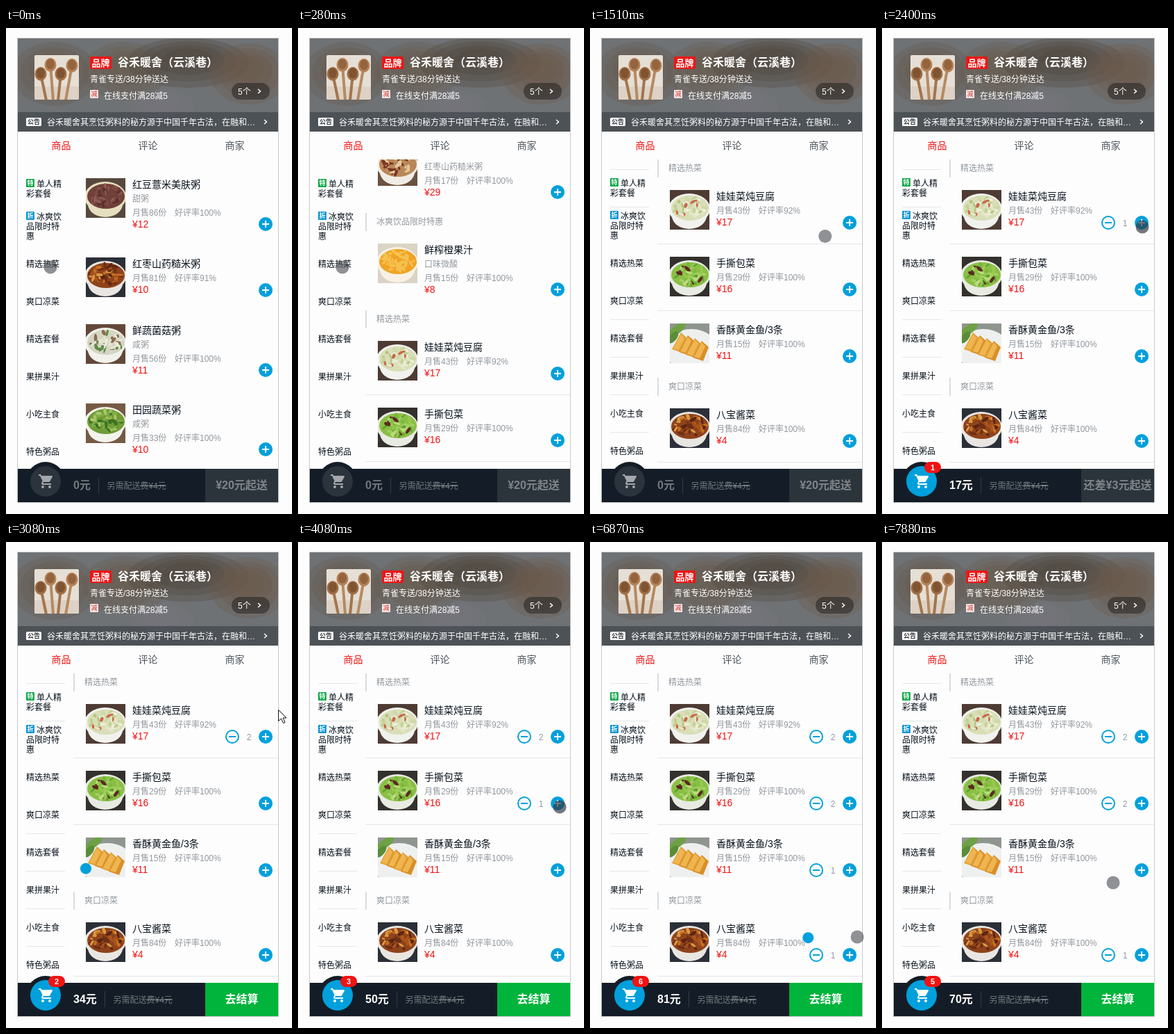
These frames come from a looping animation (412 by 699 pixels, 8000 ms). An HTML page with a canvas:

```html
<!DOCTYPE html>
<html lang="zh-CN">
<head>
<meta charset="utf-8">
<title>点餐</title>
<style>
html, body { margin: 0; width: 100%; height: 100%; overflow: hidden; background: #fdfdfd; }
canvas { display: block; width: 412px; height: 699px; }
</style>
</head>
<body>
<canvas id="stage"></canvas>
<script>
const W = 412, H = 699, LOOP = 8000;
const canvas = document.getElementById('stage');
const g = canvas.getContext('2d');
const dpr = window.devicePixelRatio || 1;
canvas.width = W * dpr;
canvas.height = H * dpr;

const FONT = '"Liberation Sans", "Noto Sans CJK SC", "Noto Sans CJK", sans-serif';
const RED = '#f01414', BLUE = '#00a0dc', DARK = '#141d27', GREY = '#93999f', INK = '#07111b';

const CART = new Path2D('M7 18a2 2 0 1 0 0 4a2 2 0 0 0 0-4zM1 2v2h2l3.6 7.6-1.35 2.4c-.7 1.3.25 3 1.75 3h12v-2H7.4c-.2 0-.3-.2-.2-.4l.9-1.6h7.45c.75 0 1.4-.4 1.75-1l3.6-6.5c.35-.7-.1-1.5-.9-1.5H5.2l-.9-2zM17 18a2 2 0 1 0 0 4a2 2 0 0 0 0-4z');

// The screen refreshes in bursts: [first, last, count]
const BURSTS = [
  [130, 580, 5], [700, 1120, 3], [1240, 1640, 4], [1950, 2400, 4], [2800, 3350, 5],
  [3780, 4080, 3], [4540, 5140, 5], [5410, 5690, 3], [5820, 6320, 5], [6470, 6590, 2],
  [6870, 7420, 5], [7880, 7880, 1]
];

// Cart clicks: [time, product key, change]
const CLICKS = [
  [1890, 'tofu', 1], [2750, 'tofu', 1], [3680, 'cabbage', 1], [4490, 'cabbage', 1],
  [5357, 'fish', 1], [6803, 'pickle', 1], [7870, 'fish', -1]
];

// Pointer path: [time, x, y]
const PATH = [
  [0, 64, 344], [360, 64, 344], [580, 62, 377], [820, 110, 385], [1120, 245, 353],
  [1640, 371, 281], [1950, 371, 281], [2400, 375, 286], [2937, 376, 280], [3075, 392, 241],
  [3212, 392, 272], [3350, 377, 381], [4840, 377, 381], [5140, 377, 475], [5410, 377, 475],
  [5690, 397, 530], [5945, 397, 545], [6320, 384, 587], [6590, 381, 590], [6870, 385, 568],
  [7280, 332, 471], [7420, 333, 490], [8000, 333, 490]
];

// Dish colours: table, bowl, food, then the pieces
const STEW = ['#2b2f38', '#e9e6e2', '#8f431b', '#c8701f', '#5c2413', '#a8531c', '#d99a45', '#6e2f16'];

// Strings are section headings
const GOODS = [
  { name: '红豆薏米美肤粥', desc: '甜粥', sold: 86, rate: 100, price: 12, look: ['#57483f', '#e6dfbf', '#70403a', '#5a302c', '#7d4a43', '#8d5b52'] },
  { name: '红枣山药糙米粥', sold: 81, rate: 91, price: 10, look: STEW },
  { name: '鲜蔬菌菇粥', desc: '咸粥', sold: 56, rate: 100, price: 11, look: ['#63483a', '#f2f1ec', '#d3d6c2', '#5f8a4a', '#eeeadb', '#e3e2d0', '#8b6b52'] },
  { name: '田园蔬菜粥', desc: '咸粥', sold: 33, rate: 100, price: 10, look: ['#755a45', '#f3f3ee', '#6f9c36', '#3d7423', '#a9c668', '#82ad45'] },
  '单人精彩套餐',
  { name: '红枣山药粥套餐', desc: '红枣山药糙米粥', sold: 17, rate: 100, price: 29, look: ['#6b5140', '#efece5', '#b98858', '#7c3522', '#e2c9a0'] },
  '冰爽饮品限时特惠',
  { name: '鲜榨橙果汁', desc: '口味微酸', sold: 15, rate: 100, price: 8, look: ['#d9d4c4', '#f7f2e4', '#f0a325', '#f6c14f'] },
  '精选热菜',
  { key: 'tofu', name: '娃娃菜炖豆腐', sold: 43, rate: 92, price: 17, look: ['#4d3b34', '#f1f2ee', '#d9deb8', '#eef0dc', '#c3d08e', '#e3e8c8', '#d0d8a8', '#b3c67c', '#e9ecd4', '#c9694c'] },
  { key: 'cabbage', name: '手撕包菜', sold: 29, rate: 100, price: 16, look: ['#33302d', '#e8ebe2', '#8abf45', '#b9dc7c', '#79b53a', '#a3d060', '#63a02f', '#94c850', '#5b2a20'] },
  { key: 'fish', name: '香酥黄金鱼/3条', sold: 15, rate: 100, price: 11, fried: true },
  '爽口凉菜',
  { key: 'pickle', name: '八宝酱菜', sold: 84, rate: 100, price: 4, look: STEW }
];

const MENU = ['单人精,彩套餐', '冰爽饮,品限时特,惠', '精选热菜', '爽口凉菜', '精选套餐', '果拼果汁', '小吃主食', '特色粥品'];
const SCROLL = 727;

let nextY = 216;
const rows = GOODS.map((item, i) => {
  const row = { item, y: nextY };
  if (typeof item === 'string') nextY += 44;
  else {
    row.last = typeof GOODS[i + 1] === 'string';
    nextY += 78 + (item.desc ? 18 : 0) + (row.last ? 0 : 18);
  }
  return row;
});
const rowOf = key => rows.find(r => r.item.key === key);
const plusY = row => row.y + (row.item.desc ? 66 : 47);

const clamp = v => Math.max(0, Math.min(1, v));
const mix = (a, b, k) => a + (b - a) * k;
const bez = (s, a, b) => 3 * (1 - s) ** 2 * s * a + 3 * (1 - s) * s * s * b + s ** 3;

function ease(x, x1, y1, x2, y2) {
  let lo = 0, hi = 1;
  for (let i = 0; i < 20; i++) {
    const mid = (lo + hi) / 2;
    if (bez(mid, x1, x2) < x) lo = mid; else hi = mid;
  }
  return bez(lo, y1, y2);
}

function snap(t) {
  let out = 0;
  for (const [a, b, n] of BURSTS) {
    if (t < a) break;
    const gap = n > 1 ? (b - a) / (n - 1) : 1;
    out = a + gap * Math.min(n - 1, Math.floor((t - a) / gap + 1e-6));
  }
  return out;
}

function random(seed) {
  return () => (seed = (seed * 16807) % 2147483647) / 2147483647;
}

function rect(x, y, w, h, color, r = 0) {
  g.fillStyle = color;
  g.beginPath();
  g.roundRect(x, y, w, h, r);
  g.fill();
}

function oval(x, y, rx, ry, color, turn = 0) {
  g.fillStyle = color;
  g.beginPath();
  g.ellipse(x, y, rx, ry, turn, 0, 7);
  g.fill();
}
const disc = (x, y, r, color) => oval(x, y, r, r, color);

function shape(points, color) {
  g.fillStyle = color;
  g.beginPath();
  points.forEach(p => g.lineTo(...p));
  g.closePath();
  g.fill();
}

function line(points, color, width = 1) {
  g.strokeStyle = color;
  g.lineWidth = width;
  g.beginPath();
  points.forEach(p => g.lineTo(...p));
  g.stroke();
}

// y is the middle of the line
function text(str, x, y, size, color, bold, align = 'left') {
  g.font = `${bold ? 'bold ' : ''}${size}px ${FONT}`;
  g.textAlign = align;
  g.fillStyle = color;
  g.fillText(str, x, Math.round(y + size * 0.38));
  return g.measureText(str).width;
}

function clipped(x, y, w, h, draw, r = 0) {
  g.save();
  g.beginPath();
  g.roundRect(x, y, w, h, r);
  g.clip();
  draw();
  g.restore();
}

// Stacked ovals give the stepped edge of the blurred backdrop
function blot(x, y, rx, ry, rgb) {
  for (let i = 0; i < 4; i++) {
    const k = 1 - i * 0.2;
    oval(x, y - i * 2, rx * k, ry * k, `rgba(${rgb},.3)`);
  }
}

function chevron(x, y) {
  line([[x - 2, y - 3], [x + 1.5, y], [x - 2, y + 3]], '#fff', 1.5);
}

function avatar() {
  clipped(41, 39, 64, 64, () => {
    rect(41, 39, 64, 64, '#e6dfd5');
    rect(41, 84, 64, 19, '#ddd2c5');
    [[50, 66, 58], [64, 53, 68], [79, 66, 75], [95, 54, 86]].forEach(([x, y, foot], i) => {
      line([[x, y], [foot, 104]], i % 2 ? '#b58a61' : '#a3754d', 4);
      oval(x, y, 8.5, 10, i % 2 ? '#b58258' : '#a06f46');
      oval(x, y - 1, 6, 7.5, i % 2 ? '#94643e' : '#805331');
    });
  }, 2);
}

function header() {
  clipped(17, 15, 375, 134, () => {
    rect(17, 15, 375, 134, '#6f7275');
    blot(70, 66, 62, 46, '101,87,74');
    blot(172, 62, 62, 42, '104,90,77');
    blot(262, 50, 88, 36, '78,67,57');
    blot(350, 66, 56, 44, '106,88,72');
    blot(225, 112, 46, 24, '116,118,122');
    blot(120, 132, 50, 22, '110,112,116');
    rect(17, 121, 375, 28, 'rgba(7,17,27,.33)');
  });
  avatar();
  rect(121, 41, 31, 18, '#ee1515', 2);
  text('品牌', 136.5, 50, 13, '#fff', true, 'center');
  text('谷禾暖舍（云溪巷）', 161, 49, 16, '#fff', true);
  text('青雀专送/38分钟送达', 121, 73, 12, '#fff');
  rect(121, 89, 12, 12, '#f3e4e2', 1);
  text('减', 127, 95, 9, '#d33a34', false, 'center');
  text('在线支付满28减5', 141, 97, 12, '#fff');
  rect(325, 79, 55, 24, 'rgba(20,20,22,.45)', 12);
  text('5个', 334, 91, 12, '#fff');
  chevron(365, 91);
  rect(29, 129, 22, 12, '#fff', 1.5);
  text('公告', 40, 135, 9, '#33363b', true, 'center');
  text('谷禾暖舍其烹饪粥料的秘方源于中国千年古法，在融和…', 59, 135, 12, '#fff');
  chevron(374, 135);
}

function tabs() {
  ['商品', '评论', '商家'].forEach((name, i) =>
    text(name, 79.5 + 125 * i, 169, 14, i ? '#4d555d' : RED, false, 'center'));
}

function menu(settled) {
  const shift = settled ? 0 : 1;
  MENU.forEach((label, i) => {
    const y = 203 + 54 * i + shift;
    const parts = label.split(',');
    parts.forEach((part, n) => {
      const ly = y + 27 + (n - (parts.length - 1) / 2) * 14;
      const tag = i < 2 && n === 0;
      if (tag) {
        rect(29, ly - 7, 12, 12, i ? '#1296d4' : '#16a84c', 1);
        text('特折'[i], 35, ly - 1, 9, '#fff', true, 'center');
      }
      text(part, tag ? 44 : 29, ly, 12, INK);
    });
    if (settled && i !== 2 && i !== 3) line([[29, y + 0.5], [85, y + 0.5]], '#e4e6e8');
  });
}

function friedFish() {
  rect(0, 0, 57, 57, '#8f968f');
  oval(31, 38, 38, 30, '#eef0f0');
  oval(10, 9, 15, 6, '#6fa045', -0.6);
  oval(5, 20, 10, 5, '#5a8d3a', -0.9);
  for (let i = 0; i < 4; i++) {
    const x = 3 + i * 10, y = 25 + i * 4;
    shape([[x, y + 12], [x + 13, y - 12], [x + 23, y - 3], [x + 15, y + 17]], i % 2 ? '#d98f28' : '#e3a034');
    shape([[x + 2, y + 11], [x + 13, y - 10], [x + 18, y - 4], [x + 10, y + 13]], '#efb550');
  }
}

function bowlOf([table, bowl, food, ...bits], seed) {
  const rnd = random(seed);
  rect(0, 0, 57, 57, table);
  oval(28, 37, 25, 19, bowl);
  oval(28, 27, 30, 22, bowl);
  oval(29, 26, 27, 18, food);
  for (let i = 0; i < 45; i++) {
    const a = rnd() * 6.28, d = Math.sqrt(rnd());
    oval(29 + Math.cos(a) * d * 23, 25 + Math.sin(a) * d * 14, 2 + rnd() * 4, 1.2 + rnd() * 1.4, bits[i % bits.length], a * 3);
  }
}

function photo(item, x, y) {
  clipped(x, y, 57, 57, () => {
    g.translate(x, y);
    if (item.fried) friedFish();
    else bowlOf(item.look, item.price * 997 + 31);
  });
}

function control(y, count) {
  disc(374, y, 10, BLUE);
  line([[369, y], [379, y]], '#fff', 2);
  line([[374, y - 5], [374, y + 5]], '#fff', 2);
  if (!count) return;
  g.strokeStyle = BLUE;
  g.lineWidth = 2;
  g.beginPath();
  g.arc(326, y, 9, 0, 7);
  g.stroke();
  line([[321, y], [331, y]], BLUE, 2);
  text(String(count), 350, y, 12, GREY, false, 'center');
}

function product(row, y, count, ruled) {
  const { item } = row;
  photo(item, 115, y);
  text(item.name, 182, y + 9, 14, INK);
  let ly = y + 29;
  if (item.desc) {
    text(item.desc, 182, ly, 12, GREY);
    ly += 20;
  }
  text(`月售${item.sold}份`, 182, ly, 12, GREY);
  text(`好评率${item.rate}%`, 243, ly, 12, GREY);
  text('¥' + item.price, 182, ly + 17, 14, RED);
  control(plusY(row) - row.y + y, count);
  if (ruled && !row.last) {
    const ry = y + (item.desc ? 95 : 77) + 0.5;
    line([[97, ry], [392, ry]], '#e4e6e8');
  }
}

function list(t, counts) {
  const offset = Math.round(SCROLL * ease(clamp((t - 100) / 330), 0.25, 0.46, 0.45, 0.94));
  clipped(97, 189, 295, 445, () => rows.forEach(row => {
    const y = row.y - offset;
    if (y < 60 || y > 650) return;
    if (typeof row.item === 'string') {
      rect(97, y, 2, 26, '#d9dde1');
      text(row.item, 113, y + 12.5, 12, GREY);
    } else product(row, y, counts[row.item.key] || 0, t > 0);
  }));
}

function cartIcon(color) {
  g.save();
  g.translate(46, 640);
  g.fillStyle = color;
  g.fill(CART);
  g.restore();
}

function bar(total, amount) {
  const dim = 'rgba(255,255,255,.4)';
  rect(17, 634, 375, 48, DARK);
  disc(57, 652, 28, DARK);
  disc(57, 652, 22, amount ? BLUE : '#2b343c');
  cartIcon(amount ? '#fff' : '#a3a7ab');
  if (amount) {
    rect(61, 624, 24, 16, RED, 8);
    text(String(amount), 73, 632, 11, '#fff', true, 'center');
  }
  const end = 97 + text(total + '元', 97, 657, 16, amount ? '#fff' : dim, true);
  const sep = Math.round(end + 12) - 0.5;
  line([[sep, 646], [sep, 669]], 'rgba(255,255,255,.14)');
  const width = text('另需配送费¥4元', sep + 12, 658, 12, dim);
  line([[sep + 12 + width - 38, 658.5], [sep + 12 + width, 658.5]], dim);
  const ready = total >= 20;
  const label = ready ? '去结算' : total ? `还差¥${20 - total}元起送` : '¥20元起送';
  rect(287, 634, 105, 48, ready ? '#00b43c' : '#2b333b');
  text(label, 339.5, 657, 16, ready ? '#fff' : dim, true, 'center');
}

function balls(t) {
  for (const [start, key, change] of CLICKS) {
    const k = (t - start) / 400;
    if (change < 0 || k < 0 || k >= 1) continue;
    const from = plusY(rowOf(key)) - SCROLL - 20;
    // The fall starts a moment after the slide
    const fall = ease(clamp(k - 0.015), 0.49, -0.29, 0.75, 0.41);
    disc(mix(366, 57, k), mix(from, 653, fall), 8, BLUE);
  }
}

function pointer(t) {
  const i = Math.max(1, PATH.findIndex(p => p[0] >= t));
  const [ta, xa, ya] = PATH[i - 1], [tb, xb, yb] = PATH[i];
  const k = (t - ta) / (tb - ta);
  const x = mix(xa, xb, k), y = mix(ya, yb, k);
  if (x < 391) {
    const held = x > 374 && x < 380;
    disc(x, y, 9.5, held ? 'rgba(50,56,64,.68)' : 'rgba(60,64,70,.57)');
    return;
  }
  g.beginPath();
  [[0, 0], [0, 16], [4, 12.5], [7, 19], [9.5, 18], [6.5, 11.5], [11.5, 11.5]].forEach(([dx, dy]) => g.lineTo(x + 0.5 + dx, y + 0.5 + dy));
  g.closePath();
  g.fillStyle = '#fff';
  g.fill();
  g.strokeStyle = '#111';
  g.lineWidth = 1;
  g.stroke();
}

function draw(t) {
  const counts = {};
  let total = 0, amount = 0;
  for (const [time, key, change] of CLICKS) {
    if (t < time) continue;
    counts[key] = (counts[key] || 0) + change;
    amount += change;
    total += change * rowOf(key).item.price;
  }
  g.setTransform(dpr, 0, 0, dpr, 0, 0);
  rect(0, 0, W, H, '#fdfdfd');
  header();
  tabs();
  menu(t >= 360);
  list(t, counts);
  bar(total, amount);
  g.strokeStyle = '#c9c9c9';
  g.lineWidth = 1;
  g.strokeRect(16.5, 14.5, 376, 668);
  balls(t);
  pointer(t);
}

const begin = performance.now();
function tick() {
  draw(snap((performance.now() - begin) % LOOP));
  requestAnimationFrame(tick);
}
tick();
</script>
</body>
</html>
```
